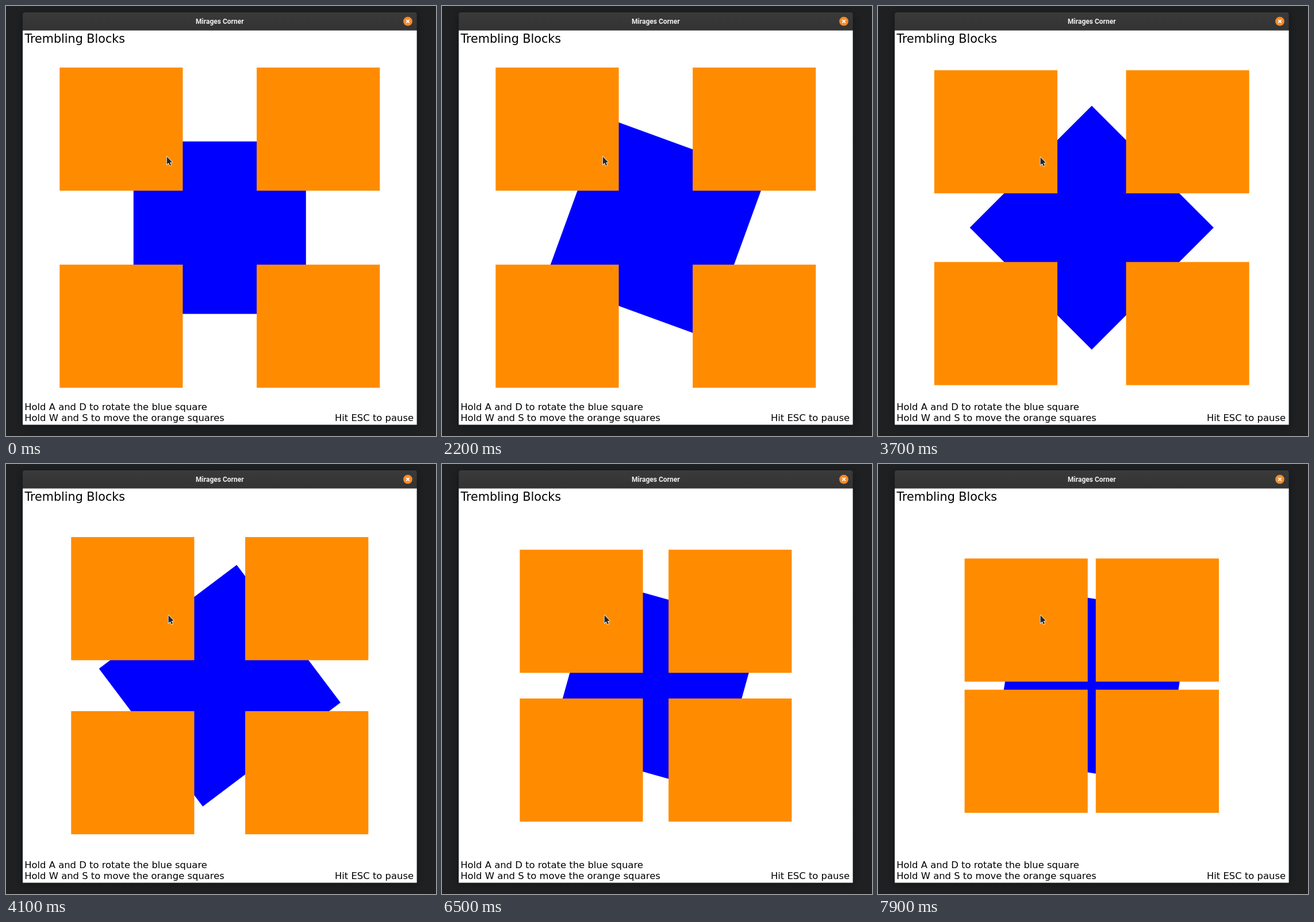
Animation, 748 px wide and 748 px high, one loop 8000 ms. Source, as an HTML page with a canvas:

```html
<!DOCTYPE html>
<html lang="en">
<head>
<meta charset="utf-8">
<title>Mirages Corner</title>
<style>
  html, body { margin: 0; width: 100%; height: 100%; overflow: hidden; background: #1e2022; }
  canvas { display: block; width: 748px; height: 748px; }
</style>
</head>
<body>
<canvas id="stage" width="748" height="748"></canvas>
<script>
const ctx = document.getElementById('stage').getContext('2d');
const LOOP = 8000, TICK = 100;
const CX = 371.8, CY = 385.6;
const HALF = 150, BLOCK = 214.2;
const WIN = { left: 29.1, top: 11, right: 714.6, bottom: 728.4, bar: 42.6 };

// [time, value] pairs, joined by straight lines
const ANGLE = [[367, 0], [2400, 122], [2500, 122], [2717, 135], [3967, 135],
               [4100, 143], [4900, 190], [6500, 285.6], [7900, 369]];
const GAP = [[2750, 64.3], [3131, 79], [3200, 79], [4100, 44.3], [4670, 22.3],
             [7500, 22.3], [7900, 7]];

function track(keys, t) {
  if (t <= keys[0][0]) return keys[0][1];
  for (let i = 1; i < keys.length; i++) {
    const [t0, a] = keys[i - 1], [t1, b] = keys[i];
    if (t <= t1) return a + (b - a) * (t - t0) / (t1 - t0);
  }
  return keys[keys.length - 1][1];
}

function text(str, x, y, font, color, align) {
  ctx.font = font;
  ctx.fillStyle = color;
  ctx.textAlign = align || 'left';
  ctx.fillText(str, x, y);
}

function drawWindow() {
  const { left, top, right, bottom, bar } = WIN;
  const width = right - left;
  ctx.fillStyle = '#1e2022';
  ctx.fillRect(0, 0, 748, 748);

  ctx.save();
  ctx.shadowColor = 'rgba(0,0,0,0.4)';
  ctx.shadowBlur = 16;
  ctx.shadowOffsetY = 3;
  const shade = ctx.createLinearGradient(0, top, 0, bar);
  shade.addColorStop(0, '#3a3a3a');
  shade.addColorStop(1, '#333333');
  ctx.fillStyle = shade;
  ctx.beginPath();
  ctx.roundRect(left, top, width, bottom - top, [4, 4, 0, 0]);
  ctx.fill();
  ctx.restore();

  ctx.fillStyle = '#fff';
  ctx.fillRect(left, bar, width, bottom - bar);
  text('Mirages Corner', CX, 31, 'bold 12px Roboto, "Open Sans", sans-serif', '#f0f0f0', 'center');

  ctx.fillStyle = '#f68b28';
  ctx.beginPath();
  ctx.arc(699, 26.6, 7.9, 0, Math.PI * 2);
  ctx.fill();
  ctx.strokeStyle = '#fff';
  ctx.lineWidth = 1.8;
  ctx.beginPath();
  for (const s of [-1, 1]) {
    ctx.moveTo(699 - 2.8, 26.6 - 2.8 * s);
    ctx.lineTo(699 + 2.8, 26.6 + 2.8 * s);
  }
  ctx.stroke();
}

function drawLabels() {
  const face = 'px "DejaVu Sans", sans-serif', small = 16.4 + face;
  text('Trembling Blocks', 32.4, 64.2, 20.7 + face, '#000');
  text('Hold A and D to rotate the blue square', 32.2, 703, small, '#000');
  text('Hold W and S to move the orange squares', 32.2, 722.4, small, '#000');
  text('Hit ESC to pause', 709, 722.4, small, '#000', 'right');
}

function drawSquares(t) {
  ctx.save();
  ctx.translate(CX, CY);
  ctx.save();
  ctx.rotate(track(ANGLE, t) * Math.PI / 180);
  ctx.fillStyle = '#0000ff';
  ctx.fillRect(-HALF, -HALF, HALF * 2, HALF * 2);
  ctx.restore();

  const gap = track(GAP, t), far = -gap - BLOCK;
  ctx.fillStyle = '#ff8c00';
  for (const x of [far, gap])
    for (const y of [far, gap]) ctx.fillRect(x, y, BLOCK, BLOCK);
  ctx.restore();
}

function drawPointer(t) {
  const moved = t >= 2600;
  ctx.save();
  ctx.translate(moved ? 282.6 : 279.8, moved ? 263 : 262);
  ctx.beginPath();
  [[0, 0], [0, 13.6], [3.1, 10.9], [5.2, 15.7], [7.4, 14.7], [5.3, 10], [9.2, 9.7]]
    .forEach(([x, y]) => ctx.lineTo(x, y));
  ctx.closePath();
  ctx.lineJoin = 'round';
  ctx.lineWidth = 1.6;
  ctx.strokeStyle = '#fff';
  ctx.stroke();
  ctx.fillStyle = '#1c2733';
  ctx.fill();
  ctx.restore();
}

function frame(now) {
  const t = Math.floor((now % LOOP) / TICK) * TICK;
  drawWindow();
  drawSquares(t);
  drawLabels();
  drawPointer(t);
}

let start = null;
function loop(now) {
  if (start === null) start = now;
  frame(now - start);
  requestAnimationFrame(loop);
}
frame(0);
requestAnimationFrame(loop);
</script>
</body>
</html>
```
